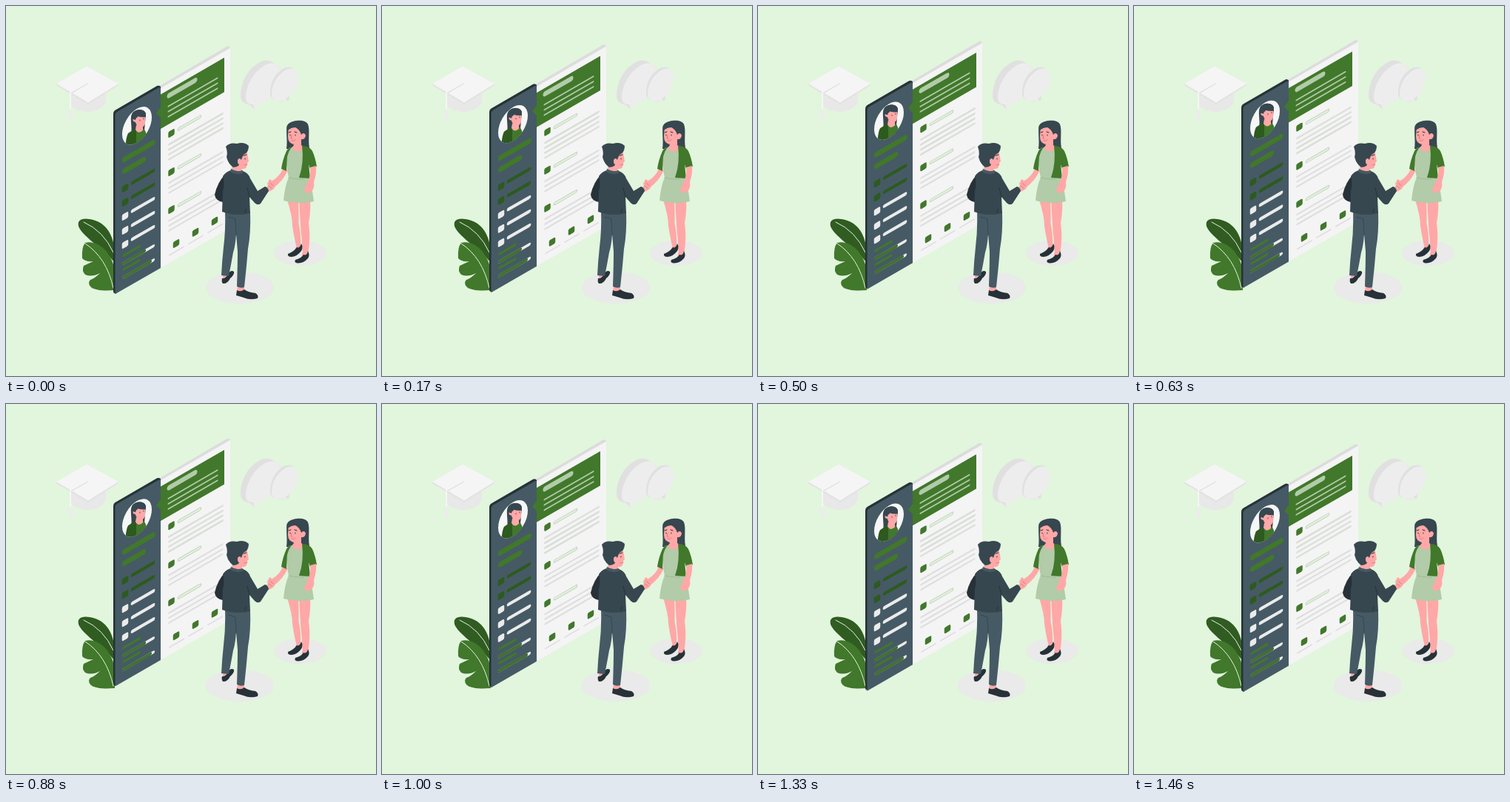
Recreate the animation shown at these times as an HTML page. Size 500 px wide and 500 px high, loop 1.5 s.

```html
<!DOCTYPE html>
<html lang="en">
<head>
<meta charset="utf-8">
<title>Handshake</title>
<style>
html, body { margin: 0; width: 100%; height: 100%; overflow: hidden; background: #e2f5dd; }
svg { display: block; width: 100vw; height: 100vh; }
.line { fill: none; stroke-linecap: round; stroke-linejoin: round; }
.skin { fill: #ffa8a7; }
.dark { fill: #263238; }
.hair { fill: #37474f; }
.green { fill: #41782b; }
</style>
</head>
<body>
<svg viewBox="0 0 500 500" xmlns="http://www.w3.org/2000/svg">
  <defs>
    <clipPath id="round"><ellipse cx="28" cy="33" rx="20" ry="23"/></clipPath>
  </defs>

  <g id="shadows" fill="#e9eae9">
    <ellipse cx="316" cy="380.500" rx="46" ry="21.500"/>
    <ellipse cx="397.500" cy="334" rx="35" ry="17"/>
  </g>

  <g id="cap">
    <path fill="#e8e8e8" d="M88 116V131Q90 142 109 143Q130 143 135 129V113L111 126Z"/>
    <path fill="#e2e2e2" d="M68 105V107L111 133L152 107V105L111 128Z"/>
    <path fill="#f5f5f5" d="M68 105L109 81.500L152 105L111 130.500Z"/>
    <path class="line" stroke="#e0e0e0" stroke-width="1.500" d="M110 105L89 117"/>
    <path class="line" stroke="#f5f5f5" stroke-width="2" d="M109 104L87 116.500V141"/>
    <path fill="#ececec" d="M85 140Q87 138 89 140L90 151Q87 154 83.500 151Z"/>
  </g>

  <g id="bubbles">
    <path fill="#e0e0e0" d="M317 122C317 100 330 80 348 74Q356 72 363 78L371 84L342 132L336 140L330 134L322 131Q317 128 317 122Z"/>
    <path fill="#ededed" d="M324 125C324 104 339 83 355 78C367 75 373 84 372 96C370 112 358 128 344 132L336 140L334 133Q324 133 324 125Z"/>
    <path fill="#e0e0e0" d="M357 117C357 101 367 87 378 83Q385 81 389 86L382 128L370 129L361 126Q357 123 357 117Z"/>
    <path fill="#ededed" d="M359 119C359 104 370 88 382 85C391 83 395 91 394 101C392 112 386 121 378 125L381 129L373 128C364 130 359 126 359 119Z"/>
  </g>

  <g id="plant">
    <path fill="#305c22" d="M146 346C133 328 107 315 98.500 299C95 289 103 286 113 288C133 291 145 306 147 332Z"/>
    <path class="line" stroke="#e2f5dd" stroke-width="1" d="M105 292Q132 304 145 333"/>
    <path class="green" d="M147 384C136 385 119 385 114 379Q110 374 114 370Q120 368 127 361Q116 367 107 363Q102 358 105 351L118 345Q107 346 103 341Q102 326 107 320C124 316 140 331 146 352Z"/>
    <path class="line" stroke="#e2f5dd" stroke-width="1" d="M107 321Q136 340 145 381"/>
  </g>

  <g id="board">
    <path fill="#dcdcdc" d="M206 109L298 55Q301 53 303 56.500V60L209 114Z"/>
    <path class="dark" d="M149 388.500Q145 389 145 385V146Q145 142 148 140.500L204 108Q207 106.500 209 109V114L152 148Z"/>
    <g id="face" transform="matrix(1 -.577 0 1 149 145)">
      <path fill="#f4f4f4" d="M60 .5H154V243.500H60Z"/>
      <path fill="#455a64" d="M1.500-1.500H58Q60-1 60 1V243.500H-1.500V2Q-1.500-1.500 1.500-1.500Z"/>
      <path class="green" d="M60 9H146V55.500H60V40L54 31L60 26Z"/>
      <ellipse cx="28" cy="33" rx="20" ry="23" fill="#f6f6f6"/>
      <g clip-path="url(#round)">
        <g transform="matrix(1 .577 0 1 -149 -231)">
          <path class="hair" d="M169 174C171 163 167 152 170 146C173 139 186 138 189 145L187 169Z"/>
          <path fill="#2d5a1e" d="M161 195Q162 177 165 172L174 166L187 168Q191 174 191 192Z"/>
          <path class="green" d="M176 168L186 166Q191 170 191 188L176 194Z"/>
          <path class="skin" d="M176 161L185 160V168Q179 174 175 167ZM174 151Q178 152 179 147L188 149V159Q187 164 181 164Q176 162 175 157Q170 156 172 152Z"/>
          <path class="hair" d="M169 152Q171 140 181 140Q190 140 189 150Q180 151 177 148L175 154Z"/>
          <path class="line" stroke="#263238" stroke-width=".8" d="M181 154V155M186 152V153"/>
        </g>
      </g>
    </g>
  </g>

  <g id="woman">
    <path class="skin" d="M380 262L395 263Q396 279 395.500 294Q399 309 398 326L393 328Q389 311 387 297Q387 284 380 262ZM396 262H411Q412 278 409 293Q412 314 408 335L401 336Q400 316 398 297Z"/>
    <path class="skin" d="M391 327L398 321L399 327L391 332ZM400 334L408 331L409 338L400 341Z"/>
    <path class="dark" d="M381 335Q389 332 393 326Q397 328 399 321Q402 326 399 331Q394 338 386 339Q380 339 381 335ZM391 343Q399 341 402 336Q407 338 408 331Q411 337 408 341Q402 348 394 347.500Q389 347 391 343Z"/>
    <path class="hair" d="M379 193C381 180 377 167 381 161C387 153 405 153 408 160C411 167 408 180 410 192Q394 197 379 193Z"/>
    <path fill="#b2cba9" d="M382 192Q393 188 405 193L409 222L412 237L416 264Q396 269 375 263Q377 242 382 232Q377 211 382 192Z"/>
    <path class="skin" d="M374 220L381 222Q374 237 362 245L355 248L353 239L360 236Q370 230 374 220ZM386 182L399 178V188Q404 190 400 195Q391 199 386 192L389 188Z"/>
    <path class="green" d="M387 190Q382 195 380 204L379 223L372 220Q374 207 379 196Q381 192 387 190ZM400 189Q410 189 414 196Q418 205 420 217L411 220L409 214L411 233L396 232Q403 212 400 189Z"/>
    <path class="skin" d="M411 218L419 216Q420 226 416 238Q418 247 411 252Q404 254 403 248L408 237Q412 228 411 218Z"/>
    <path class="skin" d="M381.500 167Q383 162 390 162L398 166V172Q404 169 405 175Q404 181 399 180Q396 186 389 187Q381 185 381 177Z"/>
    <path class="hair" d="M380 170Q377 160 385 157Q401 152 408 160L409 176L405 174Q402 170 399 174Q397 167 391 164Q386 164 382 167Z"/>
    <path class="line" stroke="#263238" stroke-width="1" d="M384 174V175M391 174V175M382 171L385 170M390 170L393 171"/>
    <path class="line" stroke="#d9716f" stroke-width=".8" d="M386 175L385 179L387 179M386 182Q389 183 391 181"/>
    <path class="line" stroke="#9fbb95" stroke-width="1" d="M382 232Q390 234 402 234"/>
  </g>

  <g id="man">
    <path class="skin" d="M293 361L301 361L302 368L293 371ZM313 377H322V387H312Z"/>
    <path class="dark" d="M292 368Q297 369 300 362Q304 356 308 359Q309 363 303 368Q299 376 293 375Q291 373 292 368ZM312 384Q317 387 322 383Q327 387 337 388Q342 391 340 395Q330 398 321 394L311 391Z"/>
    <path fill="#455a64" d="M296 276L330 278Q331 307 327 328Q325 353 322 380Q317 382 312 379Q313 351 313 332L311 308Q310 324 307 333Q304 350 301 365L291 364Q292 344 294 326Q297 302 296 276Z"/>
    <path class="line" stroke="#37474f" stroke-width="1" d="M311 310L310 288L301 285"/>
    <path class="skin" d="M306 213L319 211V224Q311 229 305 222Z"/>
    <path class="skin" d="M350 247L355 242Q353 236 357 234L362 239L365 241Q363 248 357 250L353 252Z"/>
    <path class="dark" d="M297 227Q286 237 282 255Q283 263 293 265L300 250Z"/>
    <path class="hair" d="M304 222Q312 226 320 223Q328 226 330 233L340 250L350 244Q354 245 355 250L344 267Q340 270 336 266L329 258L330 280Q311 285 292 278L293 250Q296 240 293 230Q297 224 304 222Z"/>
    <path fill="#455a64" d="M304 220Q312 225 320 222L320 226Q311 229 303 224Z"/>
    <path class="line" stroke="#263238" stroke-width="1" d="M329 258L326 246M323 279L324 274"/>
    <path class="skin" d="M311 199L325 195Q327 203 328 210L326 212Q326 219 322 220Q314 221 310 215Z"/>
    <path class="hair" d="M297 190Q302 184 312 186Q322 183 328 189Q328 198 321 201Q319 204 318 208Q314 205 313 209Q313 213 315 214Q315 217 307 218Q300 213 298 204Q300 198 297 190Z"/>
    <path class="skin" d="M313 209Q314 205 317 206.500Q319 210 316 214Q313 214 313 209Z"/>
    <path class="line" stroke="#263238" stroke-width="1" d="M323 206V207M321 202L325 201"/>
    <path class="line" stroke="#d9716f" stroke-width=".8" d="M322 215L326 214M357 239L361 243M355 243L359 246"/>
  </g>
</svg>
<script>
const NS = 'http://www.w3.org/2000/svg';
const face = document.getElementById('face');
const board = document.getElementById('board');
const GREEN = '#41782b', DEEP = '#2d5a1e', PALE = '#ebebeb', GREY = '#dedede';

function add(tag, attrs) {
  const el = document.createElementNS(NS, tag);
  for (const key in attrs) el.setAttribute(key, attrs[key]);
  face.appendChild(el);
}

// Stage position to the slanted plane of the board
const flat = (x, y) => [x - 149, y - 145 + (x - 149) * 0.577];

function bar(x, y, length, width, color) {
  const [u, v] = flat(x, y);
  add('path', { class: 'line', d: `M${u} ${v}h${length}`, stroke: color, 'stroke-width': width });
}

function tile(x, y, size, color) {
  const [u, v] = flat(x, y);
  add('rect', { x: u - size / 2, y: v - size / 2, width: size, height: size, rx: 2, fill: color });
}

// Dark panel
bar(160.5, 207, 37.5, 7.5, GREEN);
bar(160.5, 222.5, 25, 7.5, GREEN);
for (let i = 0; i < 5; i++) {
  const y = 246 + i * 19, color = i < 2 ? DEEP : PALE;
  tile(161, y, 8.5, color);
  bar(171, y - 7.1, 28, 4.7, color);
}
[[337, 28], [356, 36]].forEach(([y, done]) => {
  bar(159, y, 21, 3.5, GREEN);
  bar(159, y + 10.5, 40, 4, PALE);
  bar(159, y + 10.5, done, 4, DEEP);
  bar(159, y + 10.5, done, 2.4, GREEN);
});

// Header
bar(221, 120.5, 34, 7, '#b2cba9');
for (let i = 0; i < 3; i++) bar(219.5, 135.5 + i * 7, 66, 2, '#b2cba9');

// Sections
[172, 224, 275].forEach((y, n) => {
  tile(223.5, y, 8.5, GREEN);
  bar(234, y - 6, 28, 4.4, '#b2cba9');
  bar(234, y - 6, 28, 3, '#e3eedf');
  for (let i = 0; i < (n ? 3 : 4); i++) {
    const top = y + 15 + i * 6.7;
    bar(220.5, top, 72, 2.4, n ? GREY : '#cdd3ca');
    if (!n) bar(220.5, top, 72, 1.1, '#e4e6e2');
  }
});
for (let i = 0; i < 3; i++) {
  const x = 230 + i * 26, y = 321 - i * 15.2;
  tile(x, y, 8.5, GREEN);
  bar(x - 9, y + 15.5, 19, 1.8, GREY);
}

// Steady rise and fall, drawn 24 times a second
const LOOP = 1500, STEP = LOOP / 36, PEAK = 730, RISE = 10;
function draw(now) {
  const t = Math.floor(((now + 5) % LOOP) / STEP) * STEP;
  const away = Math.abs(t - PEAK);
  const gap = Math.min(away, LOOP - away) / (LOOP / 2);
  const y = 0.27 - RISE * (1 - gap);
  board.setAttribute('transform', `translate(0 ${y.toFixed(3)})`);
}

const start = performance.now();
function tick() {
  draw(performance.now() - start);
  requestAnimationFrame(tick);
}
tick();
</script>
</body>
</html>
```
